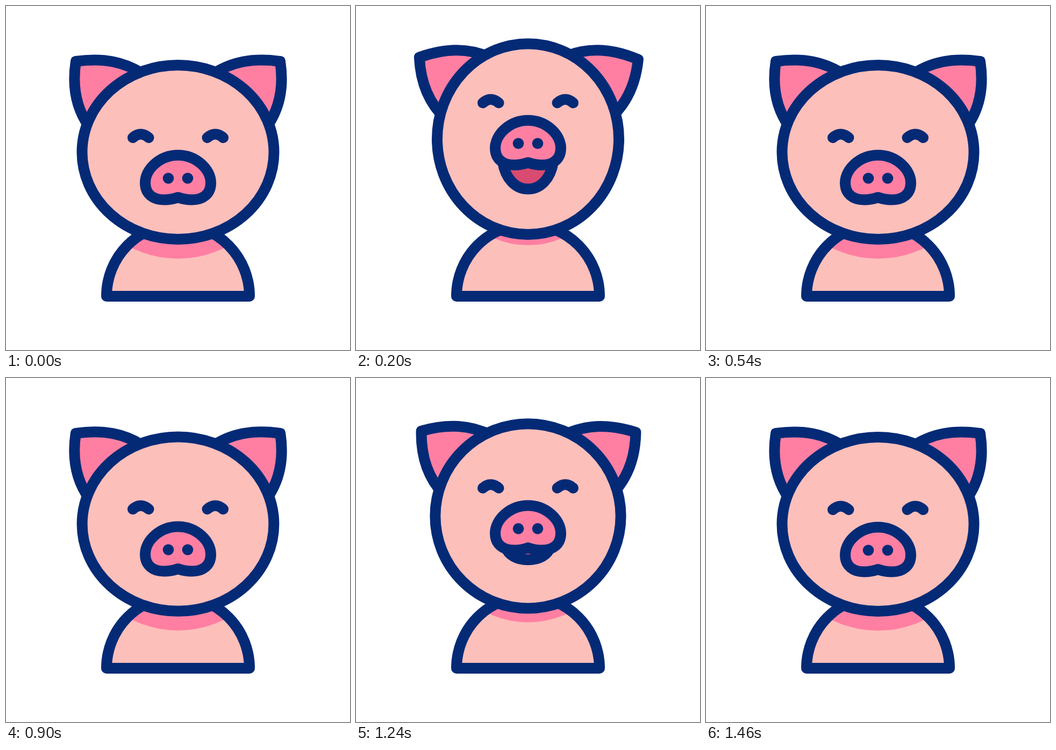
Write an HTML page that moves like this. It is 640 px wide and 640 px high and loops after 1.8 s.

```html
<!DOCTYPE html>
<html lang="en">
<head>
<meta charset="utf-8">
<title>Laughing pig</title>
<style>
  html, body { margin: 0; width: 100%; height: 100%; overflow: hidden; background: #fff; }
  svg { display: block; width: 100%; height: 100%; }
  .line { stroke: #042a76; stroke-width: 20; stroke-linecap: round; stroke-linejoin: round; }
  .skin { fill: #fdbfba; }
  .pink { fill: #ff7fa2; }
  .tongue { fill: #d94b70; }
  .none { fill: none; }
  .dot { fill: #042a76; }
</style>
</head>
<body>
<svg viewBox="0 0 640 640">
  <defs>
    <path id="torso" d="M187 540A133 134 0 0 1 453 540Z"/>
    <path id="ear" class="line pink" d="M130 103C123 148 130 190 155 225L260 130C222 103 180 96 130 103Z"/>
    <path id="eye" class="line none" d="M236 245Q250.500 232 265.500 245"/>
    <clipPath id="torsoClip"><use href="#torso"/></clipPath>
  </defs>

  <use href="#torso" class="skin"/>
  <ellipse id="shadow" class="pink" cx="320" clip-path="url(#torsoClip)"/>
  <use href="#torso" class="line none"/>

  <use id="leftEar" href="#ear"/>
  <g transform="matrix(-1 0 0 1 640 0)"><use id="rightEar" href="#ear"/></g>
  <ellipse id="head" class="line skin" cx="320"/>

  <g id="face">
    <use href="#eye"/>
    <use href="#eye" transform="matrix(-1 0 0 1 640 0)"/>
    <path id="mouth" class="line tongue"/>
    <path class="line pink" d="M320 277.500C353 277.500 381 303 381 329C381 350 366 360.500 346 360.500C336 360.500 327 358.500 320 356C313 358.500 304 360.500 294 360.500C274 360.500 259 350 259 329C259 303 287 277.500 320 277.500Z"/>
    <circle class="dot" cx="302" cy="320.500" r="10.300"/>
    <circle class="dot" cx="338" cy="320.500" r="10.300"/>
  </g>
</svg>
<script>
  const LOOP = 1800;
  // Each laugh: start, peak and end in ms
  const LIFT = [[0, 188, 535], [886, 1093, 1445]];
  const OPEN = [[0, 190, 530], [886, 1080, 1400]];
  const FLAP = [[0, 255, 500], [886, 1135, 1375]];

  const part = id => document.getElementById(id);
  const [shadow, leftEar, rightEar, head, face, mouth] =
    ['shadow', 'leftEar', 'rightEar', 'head', 'face', 'mouth'].map(part);

  const set = (node, attrs) => {
    for (const key in attrs) node.setAttribute(key, attrs[key]);
  };
  const mix = (a, b, k) => a + (b - a) * k;

  function smooth(from, to, t) {
    const x = Math.min(1, Math.max(0, (t - from) / (to - from)));
    return x * x * (3 - 2 * x);
  }

  function wave(laughs, t) {
    return laughs.reduce((sum, [start, peak, end]) =>
      sum + smooth(start, peak, t) - smooth(peak, end, t), 0);
  }

  function mouthPath(open) {
    const width = mix(0.76, 1, open);
    const depth = mix(-3, 50.5, open);
    const x = dx => 320 + dx * width;
    const bottom = 355 + depth;
    const side = 355 + depth * 0.6;
    return `M${x(-47)} 355C${x(-42)} ${side} ${x(-24)} ${bottom} 320 ${bottom}` +
      `C${x(24)} ${bottom} ${x(42)} ${side} ${x(47)} 355Z`;
  }

  function render(t) {
    const lift = wave(LIFT, t);
    const flap = wave(FLAP, t);
    const top = mix(110, 70, lift);
    const bottom = mix(434, 425, lift);
    const rx = mix(178.5, 169, lift);
    const ry = (bottom - top) / 2;

    set(head, { cy: (top + bottom) / 2, rx, ry });
    set(shadow, { cy: mix(470, 445, lift) - ry, rx, ry });
    set(face, { transform: `translate(0 ${-65 * lift})` });
    set(mouth, { d: mouthPath(wave(OPEN, t)) });

    const earPose = angle => ({
      transform: `translate(0 ${-21 * lift}) rotate(${-angle * flap} 190 170)`
    });
    set(leftEar, earPose(13));
    set(rightEar, earPose(16.5));
  }

  function tick() {
    render(performance.now() % LOOP);
    requestAnimationFrame(tick);
  }
  tick();
</script>
</body>
</html>
```
